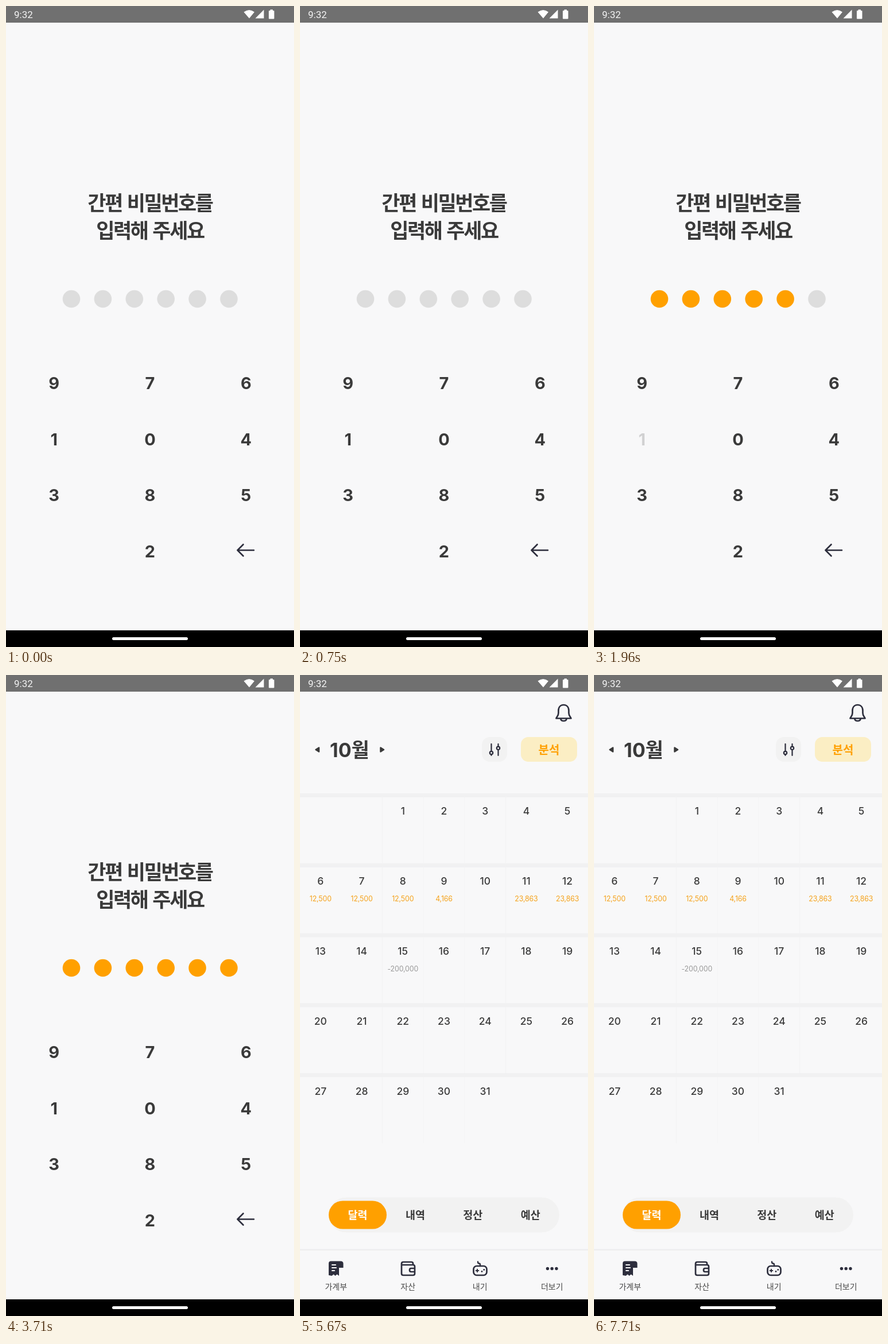
An HTML page for the animation above (7750 ms loop, 502 by 1116 pixels).

```html
<!DOCTYPE html>
<html lang="ko">
<head>
<meta charset="utf-8">
<title>간편 비밀번호</title>
<style>
  html, body { margin: 0; width: 100%; height: 100%; overflow: hidden; background: #f8f8f9; }
  svg { display: block; width: 100%; height: 100%; }
  text { font-family: Inter, "Noto Sans CJK KR", "Noto Sans CJK", sans-serif; fill: #3a3a3a; text-anchor: middle; }
  .title { font-size: 35px; font-weight: 700; letter-spacing: -2.4px; word-spacing: 2.8px; }
  .key { font-size: 29px; font-weight: 700; }
  .month { font-size: 34px; font-weight: 700; text-anchor: start; }
  .date { font-size: 17.5px; font-weight: 500; }
  .amount { font-size: 12.4px; fill: #f5a21b; letter-spacing: -.15px; }
  .amount.minus { fill: #999; }
  .analysis { font-size: 20px; font-weight: 700; fill: #ffa000; }
  .tab { font-size: 18.5px; font-weight: 700; }
  .tab.on { fill: #fff; }
  .nav { font-size: 14px; fill: #484848; }
  .clock { font: 17px Roboto, sans-serif; fill: #f4f4f4; text-anchor: start; }
  .line { fill: none; stroke: #2d2e3d; stroke-width: 2.7; stroke-linecap: round; stroke-linejoin: round; }
  .ink { fill: #2d2e3d; }
</style>
</head>
<body>
<svg viewBox="0 0 502 1116" preserveAspectRatio="none">
  <rect width="502" height="1116" fill="#f8f8f9"/>

  <g id="pin">
    <text class="title" x="251" y="356">간편 비밀번호를</text>
    <text class="title" x="251" y="404">입력해 주세요</text>
    <g id="dots"></g>
    <g id="keys"></g>
    <path class="line" stroke-width="3" d="M432 947.5H403.5M413.5 937.5L403.5 947.5L413.5 957.5"/>
  </g>

  <g id="calendar">
    <!-- Header -->
    <path class="line" d="M446.5 75.5H472.5C471 72 468.5 71 468.5 66V62C468.5 55.5 464.5 52 459.5 52S450.5 55.5 450.5 62V66C450.5 71 448 72 446.5 75.5ZM454.5 77C455.5 81 463.5 81 464.5 77"/>
    <path d="M33 126.5V133.5L27.5 130ZM140.5 126.5V133.5L146 130Z" fill="#3a3a3a" stroke="#3a3a3a" stroke-width="2.5" stroke-linejoin="round"/>
    <text class="month" x="52" y="143">10월</text>
    <rect x="317" y="108" width="44" height="43" rx="14" fill="#f2f2f2"/>
    <g class="line" style="stroke-width:2.2">
      <path d="M333.5 120V132.5M333.5 139V140M345.5 120V124M345.5 130.5V140"/>
      <circle cx="333.5" cy="135.5" r="2.7"/><circle cx="345.5" cy="127.3" r="2.7"/>
    </g>
    <rect x="385" y="108" width="98" height="43" rx="13" fill="#fbeec4"/>
    <text class="analysis" x="434" y="137.5">분석</text>

    <g id="month"></g>

    <!-- View tabs -->
    <rect x="50" y="909.5" width="402" height="61" rx="30.5" fill="#f2f2f2"/>
    <rect x="50" y="915.5" width="101" height="49" rx="24.5" fill="#ffa000"/>
    <g id="tabs"></g>

    <!-- Bottom navigation -->
    <rect y="999.5" width="502" height="2.5" fill="#eeeeef"/>
    <path class="ink" d="M54 1020.5H71Q75.5 1020.5 75.5 1025V1032H68V1046L64.5 1043.5L61.5 1046L58.5 1043.5L55.5 1046L50 1045V1024.5Q50 1020.5 54 1020.5Z"/>
    <path d="M56 1027H62M56 1032H63M56 1037H60" stroke="#f8f8f9" stroke-width="2.2" stroke-linecap="round"/>
    <path class="line" d="M197 1027V1024.5Q197 1022 194 1022H180Q177 1022 177 1025V1042Q177 1045 180 1045H197Q200 1045 200 1042V1030Q200 1027 197 1027H178M200 1033H193.5Q191 1033 191 1036T193.5 1039H200"/>
    <g class="line">
      <rect x="302.5" y="1029" width="23" height="16" rx="5.5"/>
      <path d="M314 1029V1026.5Q314 1024.5 312 1024.5T310 1021.5" stroke-width="2.4"/>
      <path d="M306.7 1037H311.3M309 1034.7V1039.3" style="stroke-width:2"/>
    </g>
    <circle class="ink" cx="317" cy="1038.5" r="1.4"/><circle class="ink" cx="320.8" cy="1035.5" r="1.4"/>
    <g id="nav"></g>
  </g>

  <!-- System bars -->
  <rect width="502" height="29" fill="#707070"/>
  <text class="clock" x="14" y="21">9:32</text>
  <path fill="#fff" d="M414.5 10.5Q424 3.5 433 10.5L424 21.5ZM449.5 6.5V21.5H434.5ZM460.5 8V6.3H465V8H466.5Q467.5 8 467.5 9V21.5Q467.5 22.5 466.5 22.5H459Q458 22.5 458 21.5V9Q458 8 459 8Z"/>
  <rect y="1087" width="502" height="29"/>
  <rect x="185" y="1099" width="132" height="5" rx="2.5" fill="#fff"/>
</svg>

<script>
const LOOP = 7750, UNLOCK = 3880;
const TAPS = [980, 1220, 1460, 1700, 1940, 2180];
const PRESSED = 0.2;
const $ = id => document.getElementById(id);

function add(parent, tag, attrs, content = '') {
  const node = document.createElementNS($('pin').namespaceURI, tag);
  for (const [name, value] of Object.entries(attrs)) node.setAttribute(name, value);
  node.textContent = content;
  return parent.appendChild(node);
}
const label = (parent, cls, x, y, content) => add(parent, 'text', { class: cls, x, y }, content);

const dots = TAPS.map((_, i) => add($('dots'), 'circle', { cx: 114 + i * 54.9, cy: 510, r: 15.3 }));

const keys = {};
[...'976104385 2'].forEach((digit, i) => {
  keys[digit] = label($('keys'), 'key', 83.7 + (i % 3) * 167.3, 667 + Math.floor(i / 3) * 97.6, digit);
});

function buildMonth() {
  const group = $('month'), cellWidth = 502 / 7, rowHeight = 121.8, top = 206;
  const amounts = { 6: '12,500', 7: '12,500', 8: '12,500', 9: '4,166', 11: '23,863', 12: '23,863', 15: '-200,000' };
  for (let row = 0; row < 5; row++) {
    const y = top + row * rowHeight;
    add(group, 'rect', { x: 0, y, width: 502, height: 7, fill: '#f1f1f2' });
    for (let col = 2; col < (row === 4 ? 5 : 6); col++)
      add(group, 'rect', { x: col * cellWidth - 0.5, y: y + 7, width: 1, height: 115, fill: '#f3f3f4' });
  }
  for (let day = 1; day <= 31; day++) {
    const cell = day + 1, x = (cell % 7 + 0.5) * cellWidth;
    const y = top + Math.floor(cell / 7) * rowHeight;
    label(group, 'date', x, y + 37.4, day);
    const amount = amounts[day];
    if (amount) label(group, amount[0] === '-' ? 'amount minus' : 'amount', x, y + 66.3, amount);
  }
}
buildMonth();

['달력', '내역', '정산', '예산'].forEach((name, i) =>
  label($('tabs'), i ? 'tab' : 'tab on', 100.5 + i * 100.4, 947, name));
['가계부', '자산', '내기', '더보기'].forEach((name, i) =>
  label($('nav'), 'nav', 62.7 + i * 125.5, 1069.5, name));
for (const x of [431.5, 439.2, 447])
  add($('nav'), 'circle', { class: 'ink', cx: x, cy: 1033.5, r: 2.7 });

// Opacity of a key around a tap: quick dip, short hold, slower recovery.
function keyOpacity(sinceTap) {
  const dip = Math.min((sinceTap + 90) / 60, (220 - sinceTap) / 180, 1);
  return 1 - (1 - PRESSED) * Math.max(0, dip);
}

function draw(now) {
  const t = now % LOOP, unlocked = t >= UNLOCK;
  $('pin').style.display = unlocked ? 'none' : '';
  $('calendar').style.display = unlocked ? '' : 'none';
  dots.forEach((dot, i) => dot.setAttribute('fill', t >= TAPS[i] ? '#ffa000' : '#dddddd'));
  keys['1'].setAttribute('opacity', Math.min(...TAPS.map(tap => keyOpacity(t - tap))));
}

const start = performance.now();
function tick() {
  draw(performance.now() - start);
  requestAnimationFrame(tick);
}
tick();
</script>
</body>
</html>
```
